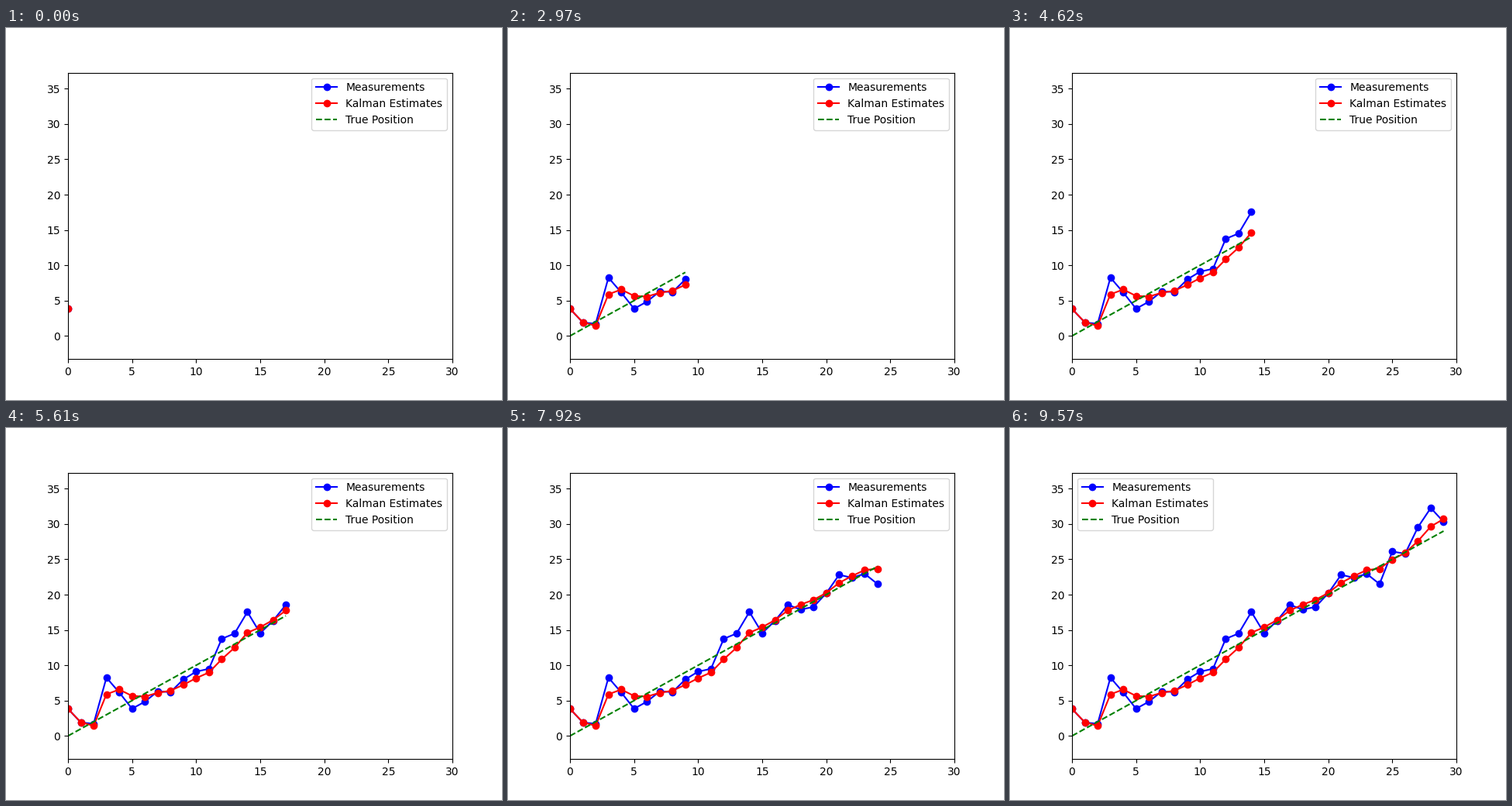
Write a matplotlib script that moves like this. It is 640 px wide and 480 px high and loops after 9900 ms.

```python
import numpy as np
import matplotlib.pyplot as plt
from matplotlib.animation import FuncAnimation

STEPS = 30
INTERVAL = 330  # ms


def kalman(readings, process_var=0.01, noise_var=4.0):
    """Constant-velocity filter; returns the position after each reading."""
    move = np.array([[1.0, 1.0], [0.0, 1.0]])
    state = np.zeros(2)
    cov = np.eye(2) * 1000
    positions = []
    for z in readings:
        state = move @ state
        cov = move @ cov @ move.T + process_var * np.eye(2)
        gain = cov[:, 0] / (cov[0, 0] + noise_var)
        state = state + gain * (z - state[0])
        cov = cov - np.outer(gain, cov[0])
        positions.append(state[0])
    return np.array(positions)


true_pos = np.arange(STEPS)
# sensor readings, the only input of the filter
measured = np.array([
    3.84, 1.9, 1.72, 8.25, 6.15, 3.85, 4.85, 6.3, 6.2, 8.0,
    9.1, 9.5, 13.75, 14.5, 17.55, 14.55, 16.3, 18.55, 17.9, 18.25,
    20.2, 22.8, 22.4, 22.95, 21.5, 26.1, 25.8, 29.55, 32.27, 30.3])

plt.rcParams["font.family"] = "DejaVu Sans"
fig, ax = plt.subplots(figsize=(6.4, 4.8), dpi=100)
ax.set_xlim(0, STEPS)
ax.set_ylim(measured.min() - 5, measured.max() + 5)

curves = [
    ("Measurements", "bo-", measured),
    ("Kalman Estimates", "ro-", kalman(measured)),
    ("True Position", "g--", true_pos),
]
lines = [ax.plot([], [], style, label=label)[0] for label, style, _ in curves]
# "best" moves the legend aside once the curves reach it
ax.legend(loc="best")


def update(frame):
    n = frame + 1
    for line, (_, _, values) in zip(lines, curves):
        line.set_data(true_pos[:n], values[:n])
    return lines


def init():
    return update(0)


anim = FuncAnimation(fig, update, frames=STEPS, init_func=init,
                     interval=INTERVAL, repeat=True, repeat_delay=0)
plt.show()
```
